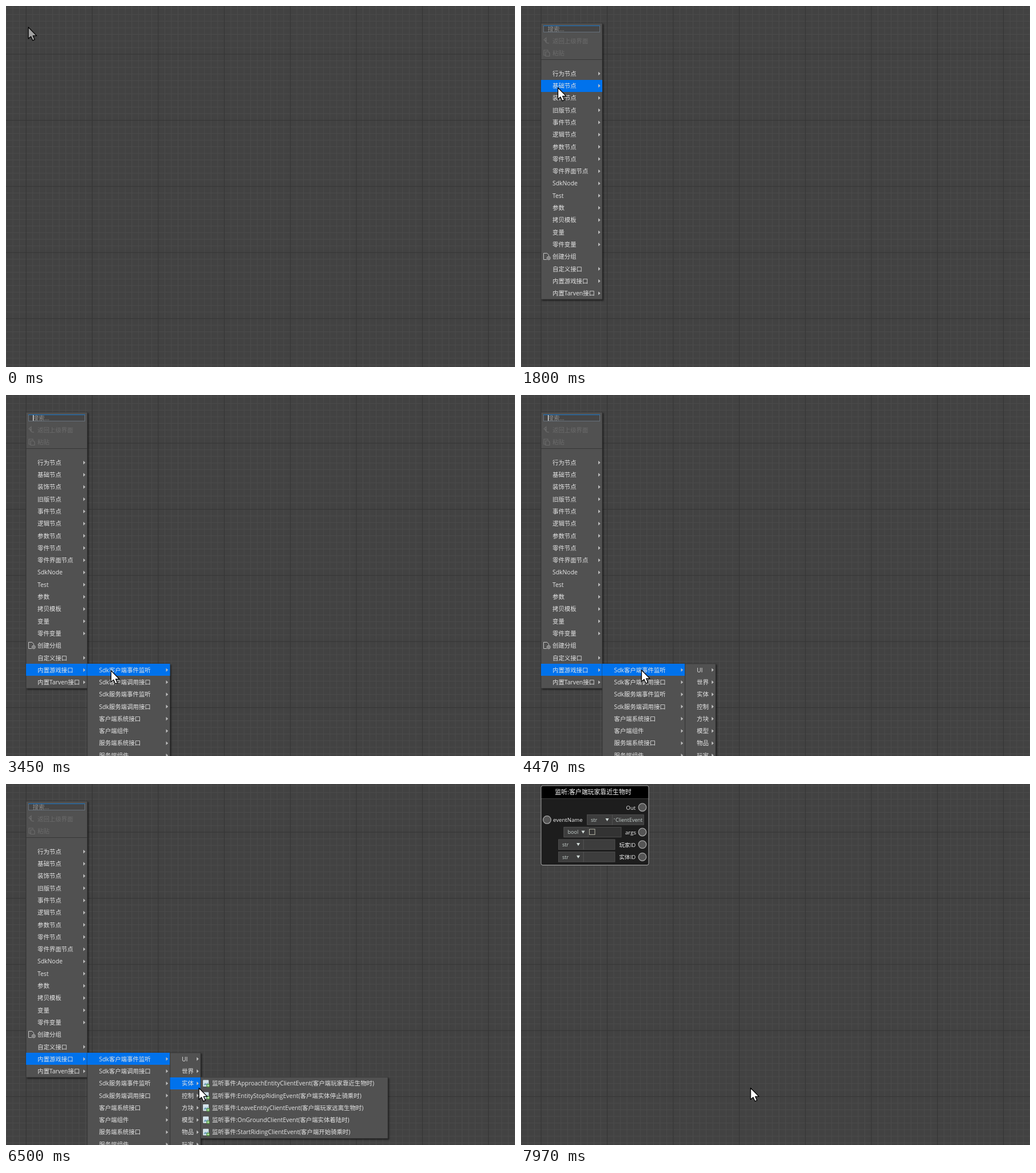
Write an HTML page that moves like this. It is 889x630 px and loops after 8 s.

```html
<!DOCTYPE html>
<html lang="zh">
<head>
<meta charset="utf-8">
<title>Node menu</title>
<style>
  html, body { margin: 0; width: 100%; height: 100%; overflow: hidden; background: #424242; }
  svg { display: block; }
  text { font: 10.4px "Open Sans", "Noto Sans CJK SC", "Noto Sans CJK JP", sans-serif; fill: #e6e6e6; white-space: pre; }
  .panel { filter: drop-shadow(2px 2px 1px rgba(0, 0, 0, .5)); }
  .off { fill: #6b6b6b; }
  .off-icon { fill: none; stroke: #6b6b6b; stroke-width: 1.2; }
  .hint { fill: #8c8c8c; }
  .title { font-size: 10.9px; fill: #fff; text-anchor: middle; }
  .label { font-size: 9.6px; fill: #f0f0f0; }
  .value { font-size: 9px; fill: #c6d0cd; }
</style>
</head>
<body>
<svg id="stage" width="889" height="630" viewBox="0 0 889 630"></svg>
<script>
const LOOP = 8000, STEP = 70, ROW = 21.3, MENU_TOP = 107.3, SUB_TOP = 469.2;
const CLOSE = 7370;
const stage = document.getElementById('stage');

function add(parent, tag, attrs, text) {
  const el = document.createElementNS('http://www.w3.org/2000/svg', tag);
  for (const key in attrs) el.setAttribute(key, attrs[key]);
  if (text) el.textContent = text;
  parent.appendChild(el);
  return el;
}
const box = (p, x, y, width, height, fill, more) => add(p, 'rect', { x, y, width, height, fill, ...more });
const path = (p, d, attrs) => add(p, 'path', { d, ...attrs });
const label = (p, x, y, text, cls = '') => add(p, 'text', { x, y: y + 3.8, class: cls }, text);

function drawGrid() {
  const cell = 11.535;
  let minor = '', major = '';
  const line = (i, d) => { if (i % 10) minor += d; else major += d; };
  for (let i = -3; i < 75; i++) line(i, `M${35.2 + i * cell} 0V630`);
  for (let i = -7; i < 48; i++) line(i, `M0 ${84.1 + i * cell}H889`);
  box(stage, 0, 0, 889, 630, '#424242');
  path(stage, minor, { stroke: '#4c4c4c' });
  path(stage, major, { stroke: '#353535' });
}

function eventIcon(p, x, y) {
  box(p, x, y - 6, 10, 11.5, '#d3e3ea', { rx: 1 });
  path(p, `M${x + 1} ${y + 3}l3 -4 2 2 2.5 -3v5z`, { fill: '#6f9fb8' });
  add(p, 'circle', { cx: x + 9, cy: y + 3.8, r: 3, fill: '#4f9a3c' });
  path(p, `M${x + 7.2} ${y + 3.8}h3.6m-1.8 -1.8v3.6`, { stroke: '#eaf5e4' });
}

// A menu panel: rows start at rowTop, the highlight is placed by select().
function makePanel(x, top, width, bottom, rowTop, textX, items, opts = {}) {
  const g = add(stage, 'g', { class: 'panel' });
  box(g, x, top, width, bottom - top, '#515151', { stroke: '#333', 'stroke-width': .8 });
  const bar = box(g, x, rowTop, width, Math.round(ROW), '#0072ec');
  items.forEach((item, i) => {
    const y = rowTop + ROW * (i + .5);
    label(g, textX, y, item);
    if (opts.events) eventIcon(g, x + 4, y);
    else if (i !== opts.plain) path(g, `M${x + width - 7} ${y - 3.2}l3.6 3.2 -3.6 3.2z`, { fill: '#bebebe' });
  });
  return {
    g,
    show(alpha) {
      g.style.opacity = alpha;
      g.style.display = alpha ? '' : 'none';
    },
    select(row) {
      const valid = row >= 0 && row < items.length;
      bar.style.display = valid ? '' : 'none';
      if (valid) bar.setAttribute('y', Math.round(rowTop + row * ROW));
    }
  };
}

function drawMenuHead(g) {
  box(g, 39.5, 34.5, 98, 11, '#454545', { stroke: '#67717b' });
  path(g, 'M39 34.5H138', { stroke: '#1674c8' });
  label(g, 46.5, 40.6, '搜索...', 'hint');
  label(g, 55, 61, '返回上级界面', 'off');
  label(g, 55, 82.3, '粘贴', 'off');
  path(g, 'M40 59l4 -3.5v7zM43 59v3q1 3 6 3', { class: 'off-icon' });
  path(g, 'M43 86h-3v-9h7v2M43 80h5l2 2v5.5h-7z', { class: 'off-icon' });
  path(g, 'M35 93.5H142', { stroke: '#363636' });
  path(g, 'M45 442.5h-5.5v-11h6l3 3v2', { fill: 'none', stroke: '#c4c4c4' });
  add(g, 'circle', { cx: 48.3, cy: 440, r: 2.9, fill: 'none', stroke: '#c4c4c4' });
  path(g, 'M46.5 440h3.6m-1.8 -1.8v3.6', { stroke: '#c4c4c4', 'stroke-width': .8 });
}

function drawNode() {
  const g = add(stage, 'g', {});
  const edge = { stroke: '#565656', 'stroke-width': .8 };
  const combo = (x, y, w, text) => {
    box(g, x, y - 8.7, w, 17.4, '#3d3d3d', edge);
    label(g, x + 6.5, y - .5, text, 'value');
    path(g, `M${x + w - 12} ${y - 2.5}h6l-3 5z`, { fill: '#d2dcd9' });
  };
  const port = (cx, cy) => add(g, 'circle', { cx, cy, r: 6.8, fill: '#555', stroke: '#a4a4a4', 'stroke-width': 1.3 });

  box(g, 35, 3, 188, 138.5, '#1d1d1d', { rx: 3 });
  path(g, 'M35 25V6a3 3 0 0 1 3 -3H220a3 3 0 0 1 3 3V25z', { fill: '#000' });
  path(g, 'M35 25.5H223', { stroke: '#3c3c3c' });
  box(g, 35, 3, 188, 138.5, 'none', { rx: 3, stroke: '#a8a8a8' });
  label(g, 126, 14, '监听:客户端玩家靠近生物时', 'title');

  label(g, 183.5, 40.7, 'Out', 'label');
  label(g, 56, 62.3, 'eventName', 'label');
  label(g, 182, 83.9, 'args', 'label');
  label(g, 171.5, 105.8, '玩家ID', 'label');
  label(g, 171.5, 127.3, '实体ID', 'label');
  for (const y of [40.7, 84, 105.6, 127.2]) port(212, y);
  port(45.5, 62.4);

  box(g, 159.5, 53.7, 55, 17.4, '#3d3d3d', edge);
  label(g, 165, 61.9, 'ClientEvent', 'value');
  box(g, 162.5, 60, 1, 1.5, '#c6d0cd');
  combo(115.5, 62.4, 44, 'str');

  box(g, 75, 75.3, 100, 17.4, '#333', edge);
  combo(75, 84, 42.5, 'bool');
  box(g, 119.5, 78.8, 9.5, 9.5, '#333', { stroke: '#b9b9aa' });

  for (const y of [105.6, 127.2]) {
    box(g, 109, y - 8.7, 55, 17.4, '#3d3d3d', edge);
    combo(65.5, y, 43.5, 'str');
  }
  return g;
}

drawGrid();
const node = drawNode();

const main = makePanel(35, 30, 107, 512, MENU_TOP, 55, [
  '行为节点', '基础节点', '装饰节点', '旧版节点', '事件节点', '逻辑节点', '参数节点',
  '零件节点', '零件界面节点', 'SdkNode', 'Test', '参数', '拷贝模板', '变量', '零件变量',
  '创建分组', '自定义接口', '内置游戏接口', '内置Tarven接口'
], { plain: 15 });
drawMenuHead(main.g);
const caret = box(main.g, 47, 35, 1, 10, '#e8e8e8');

const api = makePanel(142, 469, 144.5, 660, SUB_TOP, 162.5, [
  'Sdk客户端事件监听', 'Sdk客户端调用接口', 'Sdk服务端事件监听', 'Sdk服务端调用接口',
  '客户端系统接口', '客户端组件', '服务端系统接口', '服务端组件'
]);
const kinds = makePanel(286.5, 469, 53.5, 660, SUB_TOP, 307, [
  'UI', '世界', '实体', '控制', '方块', '模型', '物品', '玩家'
]);
const listen = s => '监听事件:' + s;
const uiEvents = makePanel(340, 469, 436, 660, SUB_TOP, 360, [
  'ClientChestCloseEvent(客户端关闭箱子界面时)',
  'ClientChestOpenEvent(客户端打开箱子界面时)',
  'ClientPlayerInventoryCloseEvent(客户端关闭物品背包界面时)',
  'ClientPlayerInventoryOpenEvent(客户端打开物品背包界面时)',
  'GridComponentSizeChangedClientEvent(客户端界面网格组件格数变化时)',
  'OnItemSlotButtonClickedEvent(客户端点击快捷栏/背包栏物品槽时)',
  'PlayerChatButtonClickClientEvent(客户端玩家点击聊天按钮时)',
  'PopScreenEvent(客户端界面移除时)'
].map(listen), { events: true });
const entityEvents = makePanel(340, 511.7, 327, 618.5, SUB_TOP + 2 * ROW, 360, [
  'ApproachEntityClientEvent(客户端玩家靠近生物时)',
  'EntityStopRidingEvent(客户端实体停止骑乘时)',
  'LeaveEntityClientEvent(客户端玩家远离生物时)',
  'OnGroundClientEvent(客户端实体着陆时)',
  'StartRidingClientEvent(客户端开始骑乘时)'
].map(listen), { events: true });

const click = add(stage, 'circle', { cx: 34, cy: 29, r: 10, fill: 'rgba(255,0,0,.47)' });
const pointer = path(stage, 'M0 0V20L4.5 16.2 7.7 23.2 11.2 21.7 8.2 14.9H14.5Z',
  { stroke: '#000', 'stroke-width': 1.3, 'stroke-linejoin': 'round' });

// Pointer moves: start time, then [step, x, y] stops.
const moves = [
  [590, [0, 39, 37], [2, 34.5, 30.5]],
  [1660, [0, 34.5, 30.5], [3, 64.5, 142.5], [12, 102, 483.5]],
  [3100, [0, 102, 483.5], [8, 210.5, 480]],
  [4670, [0, 210.5, 480], [3, 292, 483], [6, 309, 487], [8, 313.5, 505.5], [10, 317, 524]],
  [6290, [0, 317, 524], [4, 337, 530.5], [9, 404, 529.5]],
  [7970, [0, 404, 529.5], [1, 401, 530.5]]
];
const caretFlips = [1260, 1800, 2360, 2840, 3380, 3940, 4470, 5000, 5500, 6030, 6570, 7110];

function pointerAt(t) {
  const move = moves.filter(m => t >= m[0]).pop();
  if (!move) return moves[0][1].slice(1);
  const [start, ...stops] = move;
  const k = Math.min(Math.floor((t - start) / STEP) + 1, stops[stops.length - 1][0]);
  const i = stops.findIndex(s => s[0] >= k);
  const a = stops[i - 1], b = stops[i], u = (k - a[0]) / (b[0] - a[0]);
  return [a[1] + (b[1] - a[1]) * u, a[2] + (b[2] - a[2]) * u];
}

function fade(t, start, end, levels = [.18, .5, .8, 1]) {
  if (t < start || t >= end) return 0;
  return levels[Math.min(Math.floor((t - start) / STEP), levels.length - 1)];
}

const rowAt = (y, top) => Math.floor((y - top) / ROW);
const toggle = (el, on) => { el.style.display = on ? '' : 'none'; };

function render(t) {
  const [x, y] = pointerAt(t);
  pointer.setAttribute('transform', `translate(${x} ${y})`);
  pointer.setAttribute('fill', t < 1260 ? '#a2a2a2' : '#fff');
  toggle(click, t >= 920 && t < 1120);
  toggle(caret, caretFlips.filter(f => t >= f).length % 2);
  toggle(node, t >= 7640);

  main.show(fade(t, 1260, CLOSE, [.5, 1]));
  api.show(fade(t, 2630, CLOSE));
  kinds.show(fade(t, 3660, CLOSE));
  uiEvents.show(fade(t, 4950, 5500));
  entityEvents.show(fade(t, 5500, CLOSE, [1]));

  main.select(x < 142 ? rowAt(y, MENU_TOP) : 17);
  api.select(x < 142 ? -1 : 0);
  kinds.select(x < 286.5 ? -1 : rowAt(y, SUB_TOP));
  uiEvents.select(-1);
  entityEvents.select(x < 340 ? -1 : 0);
}

function tick() {
  render(performance.now() % LOOP);
  requestAnimationFrame(tick);
}
tick();
</script>
</body>
</html>
```
